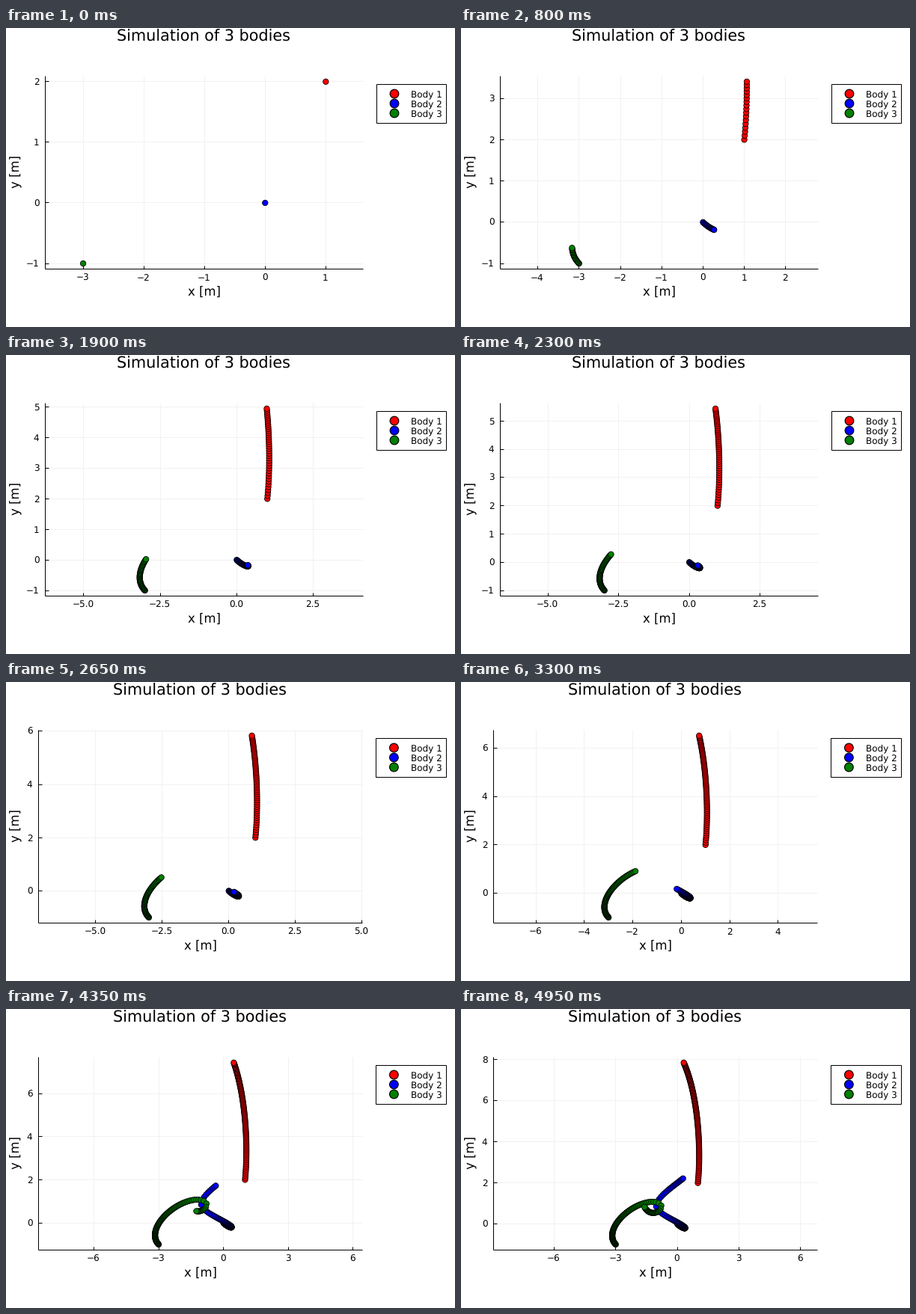
A matplotlib script that plays this animation: 600x400 px, repeating every 5000 ms.

```python
import math

import matplotlib.pyplot as plt
import numpy as np
from matplotlib.animation import FuncAnimation
from matplotlib.patches import Rectangle

W, H = 600, 400
FRAMES, INTERVAL = 100, 50
PT = 0.72  # points per pixel at 100 dpi
TOP, BOTTOM = 64.5, 322.3
COLORS = ["#ff0000", "#0000ff", "#008000"]

# Three equal masses with G = 1
DT = 0.1
START = [(1, 2), (0, 0), (-3, -1)]
SPEED = [(0.1, 1), (0.2, -0.2), (-0.2, 0.2)]

# Tick steps from large to small with their niceness
STEPS = [(m * 10.0 ** z, nice) for z in (1, 0, -1)
         for m, nice in ((5, 0.9), (3, 0.2), (2.5, 0.5), (2, 0.7), (1, 1.0))]


def gravity(pos):
    gap = pos[None] - pos[:, None]
    dist = np.linalg.norm(gap, axis=2) + np.eye(3)
    return (gap / dist[..., None] ** 3).sum(axis=1)


def simulate():
    """Velocity Verlet; returns positions as (frame, body, axis)."""
    pos, vel = np.array(START, float), np.array(SPEED, float)
    acc = gravity(pos)
    path = [pos]
    for _ in range(FRAMES - 1):
        pos = pos + vel * DT + acc * DT ** 2 / 2
        new = gravity(pos)
        vel = vel + (acc + new) * DT / 2
        acc = new
        path.append(pos)
    return np.array(path)


def pick_ticks(lo, hi):
    """Best scored set of 4 to 8 round ticks, with their labels."""
    best, choice = -math.inf, None
    for step, nice in STEPS:
        first, last = math.ceil(lo / step), math.floor(hi / step)
        count = last - first + 1
        if not 4 <= count <= 8:
            continue
        density = 1 - abs(count - 5) / 5
        spread = 1.5 * (hi - lo) / ((count - 1) * step)
        score = density / 4 + spread / 3 + nice / 4
        if score > best + 1e-9:
            best, choice = score, (step, first, last)
    step, first, last = choice
    digits = 0 if step == int(step) else 1
    values = [k * step for k in range(first, last + 1)]
    return [(v, f"{v:.{digits}f}".replace("-", "\u2212")) for v in values]


orbits = simulate()

plt.rcParams["font.family"] = "DejaVu Sans"
plt.rcParams["text.hinting"] = "none"
fig = plt.figure(figsize=(W / 100, H / 100), dpi=100, facecolor="white")
ax = fig.add_axes([0, 0, 1, 1])


def line(xs, ys, color="black", z=2):
    # Half a pixel back, as snapping rounds towards the next pixel
    ax.plot(np.array(xs) - 0.5, np.array(ys) - 0.5, color=color, lw=PT,
            zorder=z, solid_capstyle="butt")


def text(x, y, s, size, ha="center", **kw):
    ax.text(x, y, s, fontsize=size * PT, ha=ha, va="baseline", **kw)


def dots(points, colors, size, edge, z):
    ax.scatter(points[:, 0], points[:, 1], s=(size * PT) ** 2, c=colors,
               edgecolors="black", linewidths=edge * PT, zorder=z)


def draw_legend(left):
    ax.add_patch(Rectangle((left, 75), 588 - left, 52, fc="white",
                           ec="black", lw=PT, zorder=4))
    rows = 88 + 13 * np.arange(3)
    dots(np.column_stack([np.full(3, left + 24), rows]), COLORS, 11.6, 1.2, 5)
    for k, y in enumerate(rows):
        text(541, y + 4.4, f"Body {k + 1}", 12, ha="left", zorder=5)


def draw(n):
    ax.cla()
    ax.set(xlim=(0, W), ylim=(H, 0))
    ax.axis("off")

    # All of body 1 first, so that later bodies lie on top
    data = orbits[:n + 1].transpose(1, 0, 2).reshape(-1, 2)
    (x_min, y_min), (x_max, y_max) = data.min(axis=0), data.max(axis=0)
    pad = 0.03 * (y_max - y_min)
    y_lo, y_hi = y_min - pad, y_max + pad
    y_ticks = pick_ticks(y_lo, y_hi)

    # A minus sign among the y labels needs a wider left margin
    wide = y_ticks[0][0] < 0
    left, right = (52.7, 477.7) if wide else (43.7, 476.6)
    mid = (left + right) / 2
    scale = (BOTTOM - TOP) / (y_hi - y_lo)
    x_mid = (x_min + x_max) / 2
    half = (right - left) / 2 / scale

    def px(x):
        return mid + (x - x_mid) * scale

    def py(y):
        return BOTTOM - (y - y_lo) * scale

    for v, label in pick_ticks(x_mid - half, x_mid + half):
        x = px(v)
        line([x, x], [TOP, BOTTOM], "#f1f1f1", 1)
        line([x, x], [BOTTOM, BOTTOM - 4.3])
        text(x - 0.6, 338.3, label, 12)
    for v, label in y_ticks:
        y = py(v)
        line([left, right], [y, y], "#f1f1f1", 1)
        line([left, left + 4.3], [y, y])
        text(left - 8.3, y + 4.4, label, 12, ha="right")
    line([left, left], [TOP, BOTTOM + 0.5])
    line([left - 0.5, right], [BOTTOM, BOTTOM])

    text(mid - 1, 18, "Simulation of 3 bodies", 20.8)
    text(mid + 0.2, 358.5, "x [m]", 16.5)
    text(18, 192.5, "y [m]", 16.5, rotation=90, rotation_mode="anchor")

    points = np.column_stack([px(data[:, 0]), py(data[:, 1])])
    dots(points, np.repeat(COLORS, n + 1), 7.4, 0.8, 3)
    draw_legend(495 if wide else 494.4)
    return []


anim = FuncAnimation(fig, draw, frames=FRAMES, init_func=lambda: [],
                     interval=INTERVAL, repeat=True, repeat_delay=0)
plt.show()
```
